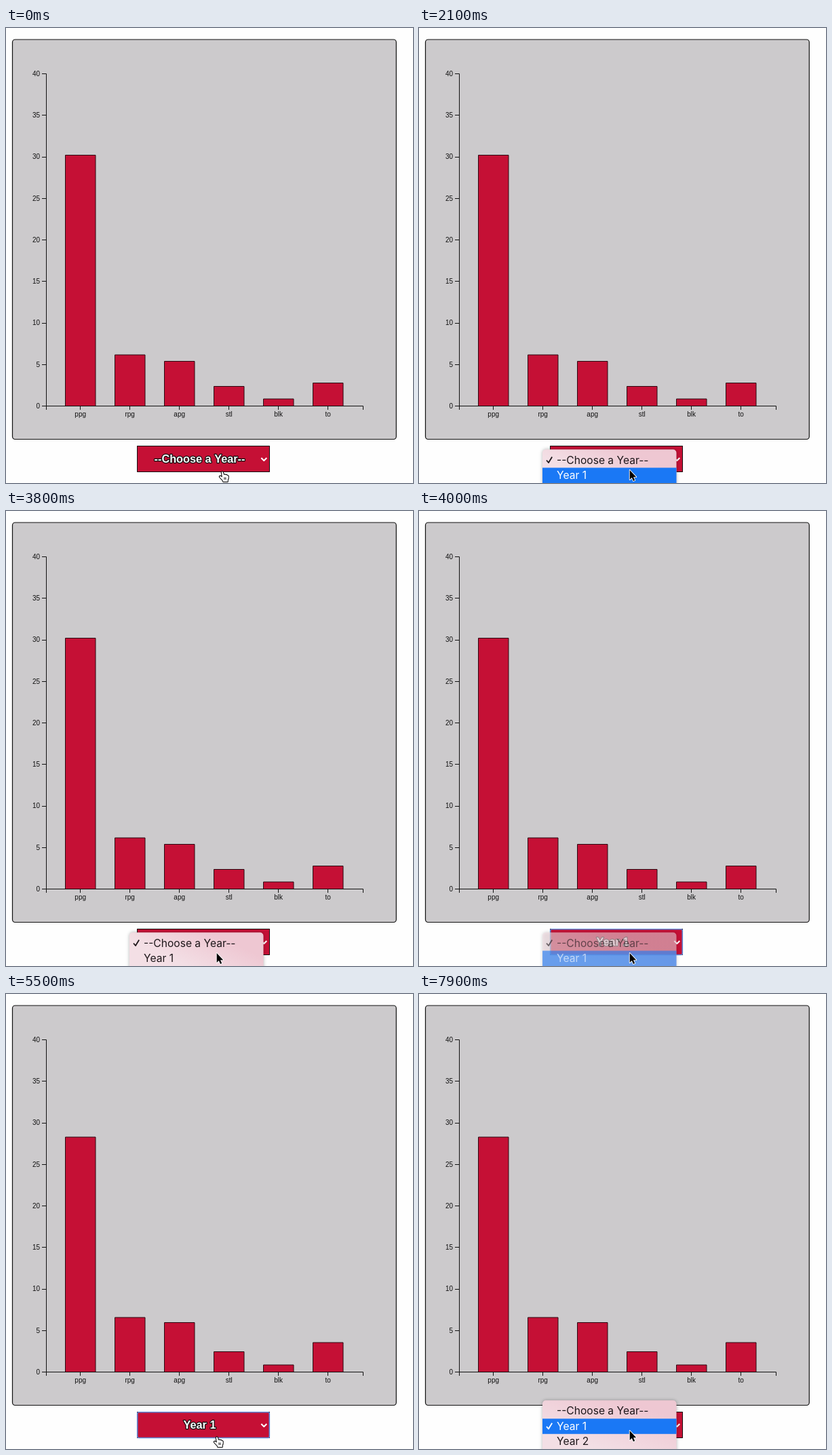
Write an HTML page with a canvas that moves like this. It is 600 by 671 pixels and loops after 8 s.

```html
<!DOCTYPE html>
<html lang="en">
<head>
<meta charset="utf-8">
<title>Bar chart with year menu</title>
<style>
  html, body { margin: 0; width: 100%; height: 100%; overflow: hidden; background: #fefefe; }
  canvas { display: block; width: 600px; height: 671px; }
</style>
</head>
<body>
<canvas id="stage" width="600" height="671"></canvas>
<script>
const ctx = document.getElementById('stage').getContext('2d');
const LOOP = 8000;
const RED = '#c51035', BLUE = '#1a78f5', INK = '#111';
const SANS = '"Liberation Sans", Arial, sans-serif';
const MENU_FONT = '15.6px Inter, Roboto, sans-serif';
const BASE = 557.5, UNIT = 12.25;

const names = ['ppg', 'rpg', 'apg', 'stl', 'blk', 'to'];
const before = [370, 75.5, 66, 29, 10.5, 34];
const after = [346.5, 80.5, 73, 30, 10.5, 43.5];
const prompt = '--Choose a Year--';

// time, x, y of the pointer
const track = [
  [0, 318, 652], [100, 318, 652], [600, 310, 642], [1250, 310, 642],
  [1750, 310, 651], [6500, 310, 651], [7150, 310, 643], [LOOP, 310, 643]
];
const T = { open: 700, flash: 3740, relight: 3850, fade: 3950, closed: 4080, grow: 4050, growFor: 1200, reopen: 7500 };

const clamp = v => Math.max(0, Math.min(1, v));
const mix = (a, b, k) => a + (b - a) * k;
const cubic = k => k < 0.5 ? 4 * k ** 3 : 1 - 4 * (1 - k) ** 3;

function pointer(t) {
  const i = track.findIndex((p, n) => n && t <= p[0]);
  const a = track[i - 1], b = track[i];
  const k = clamp((t - a[0]) / (b[0] - a[0]));
  const s = k * k * (3 - 2 * k);
  return [mix(a[1], b[1], s), mix(a[2], b[2], s)];
}

function line(points, color, width) {
  ctx.beginPath();
  points.forEach(p => ctx.lineTo(p[0], p[1]));
  ctx.strokeStyle = color;
  ctx.lineWidth = width;
  ctx.stroke();
}

function text(str, x, y, font, color, align = 'left') {
  ctx.font = font;
  ctx.textAlign = align;
  ctx.fillStyle = color;
  ctx.fillText(str, x, y);
}

function panel() {
  ctx.beginPath();
  ctx.roundRect(9.5, 17, 565.8, 589.5, 4);
  ctx.fillStyle = '#cccacc';
  ctx.fill();
  ctx.strokeStyle = INK;
  ctx.lineWidth = 1.2;
  ctx.stroke();
}

function chart(t) {
  const k = cubic(clamp((t - T.grow) / T.growFor));
  const font = '10px ' + SANS;
  names.forEach((name, i) => {
    const x = 87.5 + 73 * i, h = mix(before[i], after[i], k);
    ctx.fillStyle = RED;
    ctx.fillRect(x, BASE - h, 44.5, h);
    ctx.strokeStyle = '#2a0b12';
    ctx.lineWidth = 1;
    ctx.strokeRect(x, BASE - h, 44.5, h);
  });
  line([[53, 67.5], [59.5, 67.5], [59.5, BASE], [53, BASE]], INK, 1);
  line([[59.5, 563], [59.5, BASE], [526.5, BASE], [526.5, 563]], INK, 1);
  for (let v = 0; v <= 40; v += 5) {
    const y = BASE - v * UNIT;
    const tick = Math.floor(y) + 0.5;
    line([[53, tick], [59, tick]], INK, 1);
    text(v, 50, y + 3.4, font, INK, 'right');
  }
  names.forEach((name, i) => {
    const x = 109.7 + 73 * i;
    line([[Math.floor(x) + 0.5, BASE], [Math.floor(x) + 0.5, 563]], INK, 1);
    text(name, x, 573, font, INK, 'center');
  });
}

function button(label, focused) {
  ctx.fillStyle = RED;
  ctx.fillRect(193, 616, 196, 39);
  ctx.strokeStyle = INK;
  ctx.lineWidth = 1;
  ctx.strokeRect(193.5, 616.5, 195, 38);
  if (focused) {
    ctx.beginPath();
    ctx.roundRect(193.7, 616.7, 194.6, 37.8, 2);
    ctx.strokeStyle = '#5b86d2';
    ctx.lineWidth = 1.6;
    ctx.stroke();
  }
  ctx.font = 'bold 16.3px ' + SANS;
  ctx.textAlign = 'center';
  ctx.lineJoin = 'round';
  ctx.lineWidth = 2.4;
  ctx.strokeStyle = INK;
  ctx.strokeText(label, 285.5, 641);
  text(label, 285.5, 641, ctx.font, '#fff', 'center');
  line([[376.3, 634], [380.3, 638], [384.3, 634]], '#fff', 2);
}

function menu(top, items, checked, lit, alpha) {
  ctx.save();
  ctx.globalAlpha = alpha;
  ctx.beginPath();
  ctx.roundRect(182, top, 197.5, 100, 5);
  ctx.save();
  ctx.shadowColor = 'rgba(0,0,0,.3)';
  ctx.shadowBlur = 5;
  const g = ctx.createLinearGradient(300, top, 275, 675);
  g.addColorStop(0, '#eec7d2');
  g.addColorStop(1, '#f3dfe5');
  ctx.fillStyle = g;
  ctx.fill();
  ctx.restore();
  items.forEach((item, i) => {
    const y = top + 4.5 + 22.5 * i;
    const color = i === lit ? '#fff' : '#1e171a';
    if (i === lit) {
      ctx.fillStyle = BLUE;
      ctx.fillRect(182, y, 197.5, 22.5);
    }
    text(item, 203, y + 16.5, MENU_FONT, color);
    if (i === checked) line([[188, y + 11.5], [191, y + 15], [196.2, y + 6.5]], color, 1.8);
  });
  ctx.restore();
}

function shape(x, y, d, fill, stroke, width) {
  const p = new Path2D(d);
  ctx.save();
  ctx.translate(x, y);
  ctx.lineJoin = 'round';
  ctx.lineWidth = width;
  ctx.strokeStyle = stroke;
  ctx.stroke(p);
  ctx.fillStyle = fill;
  ctx.fill(p);
  ctx.restore();
}

function arrow(x, y) {
  shape(x, y, 'M.7 1V15L3.8 12 6 17 8.2 16 6 11.2H10.2Z', '#000', '#fff', 1.8);
}

function hand(x, y) {
  shape(x, y, 'M-.3 3.5Q.8 1.2 2 3.5L3.2 7Q4.8 5.7 5.7 7.2Q7.2 6.3 8 8Q9.7 7.6 9.8 9.5' +
    'Q10 12.5 8.8 14.5V17H2.2L1.5 15Q-.5 13.3-3 10.2Q-3.7 8.6-2 8.7L.9 10.4Z', '#fff', '#000', 2);
  line([[x + 3.8, y + 10.5], [x + 4.1, y + 14]], '#000', 0.9);
  line([[x + 5.8, y + 10.5], [x + 6, y + 14]], '#000', 0.9);
}

function draw(t) {
  const [x, y] = pointer(t);
  const first = t >= T.open && t < T.closed;
  const second = t >= T.reopen;
  ctx.fillStyle = '#fefefe';
  ctx.fillRect(0, 0, 600, 671);
  panel();
  chart(t);
  button(t < T.fade ? prompt : 'Year 1', t >= T.fade && !second);
  if (first) {
    const off = t >= T.flash && t < T.relight;
    const lit = off ? -1 : y > 648.5 ? 1 : 0;
    menu(621.5, [prompt, 'Year 1', 'Year 2'], 0, lit, 1 - clamp((t - T.fade) / (T.closed - T.fade)));
  }
  if (second) menu(599.3, [prompt, 'Year 1', 'Year 2', 'Year 3'], 1, 1, 1);
  (first || second ? arrow : hand)(x, y);
}

let start;
function tick(now) {
  start ??= now;
  draw((now - start) % LOOP);
  requestAnimationFrame(tick);
}
draw(0);
requestAnimationFrame(tick);
</script>
</body>
</html>
```
